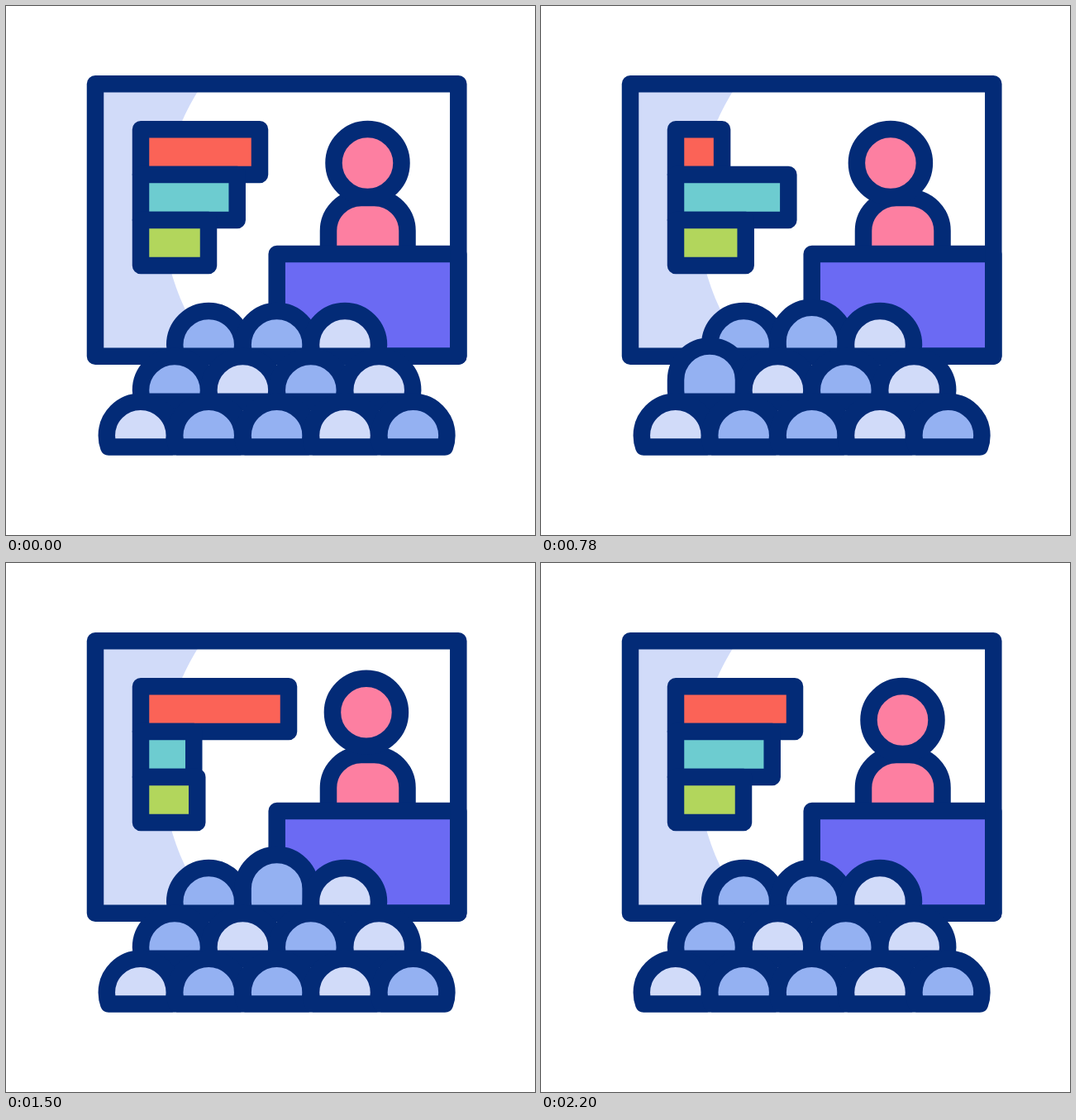
These frames come from a looping animation (640 by 640 pixels, 2400 ms). An HTML page:

```html
<!DOCTYPE html>
<html lang="en">
<head>
<meta charset="utf-8">
<title>Presentation</title>
<style>
  html, body { margin: 0; width: 100%; height: 100%; overflow: hidden; background: #fff; }
  svg { display: block; width: 100%; height: 100%; }
  .line { stroke: #032b77; stroke-width: 20.5; stroke-linejoin: round; }
</style>
</head>
<body>
<svg id="stage" viewBox="0 0 640 640">
  <clipPath id="screen"><rect x="108" y="94" width="439.5" height="330"/></clipPath>
  <g clip-path="url(#screen)">
    <rect x="108" y="94" width="440" height="330" fill="#d1dbf9"/>
    <circle cx="463" cy="249" r="273" fill="#fff"/>
  </g>
  <g id="bars"></g>
  <path class="line" fill="#fd7fa1" d="M390 300V272a40 40 0 0 1 40-40h15.500a40 40 0 0 1 40 40V300"/>
  <circle id="speaker" class="line" r="41" fill="#fd7fa1"/>
  <path class="line" fill="#6b6af3" d="M327.700 300H547.300V423.800H327.700z"/>
  <rect class="line" x="108" y="94.300" width="439.300" height="329.500" fill="none"/>
  <g id="crowd"></g>
</svg>
<script>
const LOOP = 2400, START = 200, STEP = 20;
const PALE = '#d1dbf9', BLUE = '#94b1f2';
const $ = id => document.getElementById(id);

function add(parent, tag, attrs) {
  const node = document.createElementNS('http://www.w3.org/2000/svg', tag);
  for (const name in attrs) node.setAttribute(name, attrs[name]);
  return parent.appendChild(node);
}

// Eased value between [step, value] keys, held outside them.
function track(keys, k) {
  if (k <= keys[0][0]) return keys[0][1];
  for (let i = 1; i < keys.length; i++) {
    const [k0, v0] = keys[i - 1], [k1, v1] = keys[i];
    if (k < k1) {
      const u = (k - k0) / (k1 - k0);
      return v0 + (v1 - v0) * u * u * (3 - 2 * u);
    }
  }
  return keys[keys.length - 1][1];
}

// Right edge of each bar, top to bottom.
const bars = [
  { fill: '#fb6357', keys: [[0, 307], [30, 218.8], [60, 344.8], [90, 307]] },
  { fill: '#6dccd0', keys: [[10, 279.7], [30, 299.5], [70, 224], [100, 279.7]] },
  { fill: '#b2d65c', keys: [[0, 245], [20, 256], [50, 217.5], [80, 245]] }
].map((bar, i) => ({
  ...bar,
  node: add($('bars'), 'rect', { class: 'line', x: 163, y: 149.2 + i * 54.9, height: 54.9, fill: bar.fill })
}));

const speakerX = [[10, 437.5], [40, 416.5], [70, 437.5]];
const speakerY = [[40, 190], [70, 180], [90, 190]];

// Dome of radius 41 whose top can stretch upwards by lift.
function dome(x, y, lift) {
  return `M${x - 38.6} ${y + 13.8}A41 41 0 0 1 ${x - 41} ${y}v${-lift}` +
    `a41 41 0 0 1 82 0v${lift}A41 41 0 0 1 ${x + 38.6} ${y + 13.8}z`;
}

const rows = [
  { x: 245.2, y: 410, fills: [BLUE, BLUE, PALE], riser: 1, keys: [[20, 0], [50, 19.1], [60, 19.1], [80, 0]] },
  { x: 204, y: 465, fills: [BLUE, PALE, BLUE, PALE], riser: 0, keys: [[0, 0], [30, 12.6], [40, 12.6], [60, 0]] },
  { x: 162.8, y: 519.8, fills: [PALE, BLUE, BLUE, PALE, BLUE] }
];
const risers = [];
for (const row of rows) {
  row.fills.forEach((fill, i) => {
    const x = row.x + i * 82.4;
    const node = add($('crowd'), 'path', { class: 'line', fill, d: dome(x, row.y, 0) });
    if (i === row.riser) risers.push({ node, x, y: row.y, keys: row.keys });
  });
}

function draw(time) {
  const k = Math.floor((time % LOOP - START) / STEP);
  for (const { node, keys } of bars) node.setAttribute('width', track(keys, k) - 163);
  $('speaker').setAttribute('cx', track(speakerX, k));
  $('speaker').setAttribute('cy', track(speakerY, k));
  for (const { node, x, y, keys } of risers) node.setAttribute('d', dome(x, y, track(keys, k)));
}

const begin = performance.now();
function tick() {
  draw(performance.now() - begin);
  requestAnimationFrame(tick);
}
tick();
</script>
</body>
</html>
```
